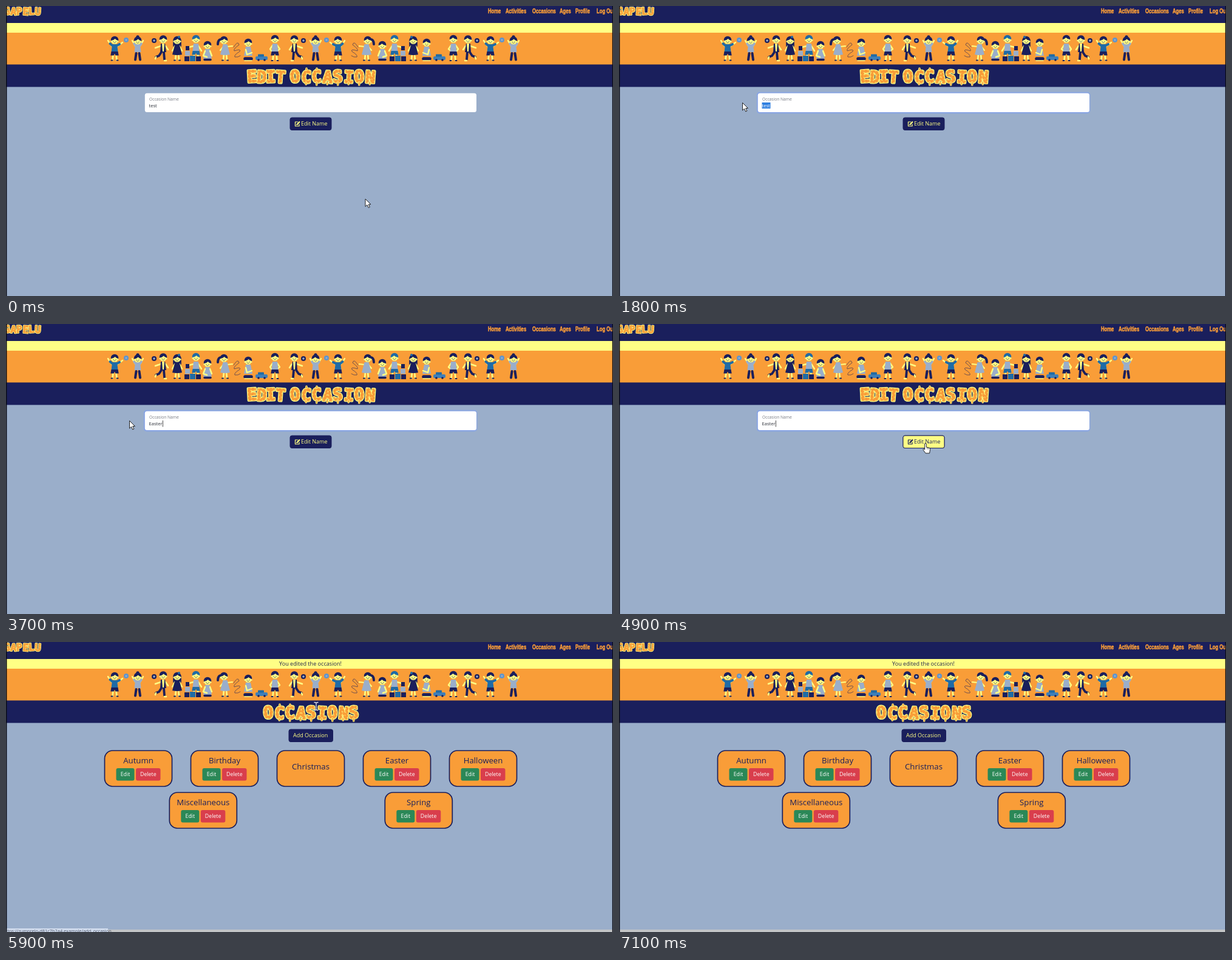
An HTML page that plays this animation: 1000 by 478 pixels, repeating every 7200 ms.

```html
<!DOCTYPE html>
<html lang="en">
<head>
<meta charset="utf-8">
<title>Edit occasion</title>
<style>
html, body { margin: 0; width: 100%; height: 100%; overflow: hidden; background: #9aaeca; }
svg { display: block; width: 100vw; height: 100vh; }
text { font-family: "Open Sans", sans-serif; white-space: pre; }
.nav text { font: bold 10px "Liberation Sans", sans-serif; fill: #f99d38; stroke: #f99d38; stroke-width: .5; stroke-linejoin: round; }
.fancy text { font-family: "DejaVu Sans Mono", monospace; font-weight: bold; }
.mid { text-anchor: middle; }
</style>
</head>
<body>
<svg id="stage" viewBox="0 0 1000 478" preserveAspectRatio="none"></svg>
<script>
const NAVY = '#1a1f5c', SKIN = '#ffff85', BLUE = '#1f6ba6', PALE = '#9aaeca', ORANGE = '#f99d38';
const LOOP = 7200, STEP = 100;

// Shape helpers
const circle = (x, y, r, f) => `<circle cx="${x}" cy="${y}" r="${r}" fill="${f}"/>`;
const rect = (x, y, w, h, f, r = 0, more = '') =>
  `<rect x="${x}" y="${y}" width="${w}" height="${h}" rx="${r}" fill="${f}" ${more}/>`;
const fill = (d, f) => `<path d="${d}" fill="${f}"/>`;
const line = (d, s, w) =>
  `<path d="${d}" fill="none" stroke="${s}" stroke-width="${w}" stroke-linecap="round" stroke-linejoin="round"/>`;
const text = (x, y, size, f, s, more = '') =>
  `<text x="${x}" y="${y}" font-size="${size}" fill="${f}" ${more}>${s}</text>`;
const group = (id, body, more = '') => `<g id="${id}" ${more}>${body}</g>`;

// Children of the banner, each around x = 0
const head = (x, y, hair = NAVY) =>
  circle(x, y - 1, 6.2, hair) + circle(x - 5.3, y + 1.5, 1.3, SKIN) + circle(x + 5.3, y + 1.5, 1.3, SKIN) +
  `<ellipse cx="${x}" cy="${y + 1}" rx="5.4" ry="4.8" fill="${SKIN}"/>` +
  fill(`M${x - 5.8} ${y}q0-6 6-6q5.600 0 5.600 6q-4-1-5-3q-3 3-6.600 3z`, hair) +
  circle(x - 2, y + 1.5, .6, NAVY) + circle(x + 2, y + 1.5, .6, NAVY) +
  line(`M${x - 1.5} ${y + 3.4}q1.5 1.2 3 0`, NAVY, .6);
const legs = (top, end, gap = 2.5) =>
  line(`M${-gap} ${top}L${-gap - 1} ${end}M${gap} ${top}L${gap + 1} ${end}`, SKIN, 2.6) +
  line(`M${-gap - 1} ${end}h-2M${gap + 1} ${end}h2`, NAVY, 2);
const shirt = (f, top = 63) => fill(`M-4 ${top}h8l1.500 13h-11z`, f);
const shorts = (f, top = 75) => fill(`M-5.500 ${top}h11l1.200 6.500h-5.200l-1.500-3l-1.500 3h-5.200z`, f);
const gown = f => fill('M-3.500 63h7l4.500 17q-8 2-16 0z', f);

const kids = {
  cheer: line('M-5 66L-11 57M5 66L13 60', SKIN, 2.4) + line('M-4 65L-7.500 62M4 65L8 63', BLUE, 4) + legs(80, 89.5) +
    shirt(BLUE) + shorts(NAVY) + head(0, 57) + circle(19, 56, 4, '#5f95cc') + circle(19, 56, 1.6, PALE),
  bun: line('M-4 66L-9 57M4 66L9 57', SKIN, 2.4) + line('M-4 65L-6 62M4 65L6 62', PALE, 3.5) +
    line('M-2.500 78L-4 88.500M2.500 78L4 88.500', NAVY, 4) + shirt(PALE) + circle(0, 50.8, 2.6, NAVY) + head(0, 57.5),
  kick: line('M1 76L-3 82L-8 84M5 76L6 88', NAVY, 3.8) + line('M0 66L-9 69M8 66L12 72', SKIN, 2.4) +
    line('M-8 84l-1 3M6 90h3', SKIN, 2.4) + fill('M0 62h7l2 14h-10z', NAVY) +
    fill('M2 62h4l-1 13h-2z', SKIN) + head(4, 55.5) + circle(-11, 57, 4, NAVY) + circle(-11, 57, 1.8, PALE),
  dress: rect(-6.8, 52, 13.6, 18, NAVY, 5) + legs(79, 89.5, 2) + line('M-4 66L-8 74M4 66L8 74', SKIN, 2.2) +
    gown(NAVY) + head(0, 57) + circle(3, 51, 2, BLUE),
  builder: line('M-4 66L-12 68M4 66L9 74', SKIN, 2.4) + legs(77, 84) + shirt(PALE, 62) + shorts(BLUE, 74) +
    head(0, 55, BLUE) + rect(-19, 83, 8, 8, NAVY) +
    rect(-10, 82, 9, 9, BLUE) + rect(0, 83, 8, 8, NAVY) + rect(-18, 74, 8, 8, PALE) + rect(-17, 66, 6, 7, NAVY),
  crouch: fill('M-4 71h8l3 15q-7 4-14 0z', PALE) + line('M-5 88.500h10', NAVY, 3.5) +
    line('M-4 74L-7 82L-1 84M4 74L7 82', SKIN, 2.4) + head(0, 65),
  ribbon: line('M-7 55q-5 1-5 8', NAVY, 4) + legs(79, 89.5, 2) + line('M3 67L12 66M-3 67L-8 73', SKIN, 2.2) +
    gown(PALE) + head(-2, 57) +
    line('M14 68q7-12 9-4q-10 7-8 10q12-4 9 1q-10 6-8 9q5 1 9-2', NAVY, .6),
  sit: fill('M-4 67h8l3 15h-14z', PALE) + line('M-5 87H5', NAVY, 5.5) + line('M-4 72L-2 80L6 77', SKIN, 2.4) +
    line('M-6 90h12', SKIN, 1.5) + head(0, 61),
  car: rect(-10, 83, 20, 6, '#3f7fb8', 2) + rect(-6, 79.5, 10, 4, BLUE, 1) + circle(-5, 89, 1.8, NAVY) + circle(5, 89, 1.8, NAVY),
  stand: line('M-4 65L-8 71L-5 75M4 65L8 71L4 74', SKIN, 2.4) + legs(80, 90) + shirt(PALE, 62) + shorts(NAVY) + head(0, 55)
};
// "<" marks a mirrored figure
const row = `cheer 179,bun 217,kick 255,dress 282,builder 313,crouch 332,ribbon 361,sit 399,car 421,stand 443,
kick 479 <,bun 510 <,cheer 547 <,ribbon 594 <,crouch 620 <,builder 640 <,dress 671 <,sit 693 <,car 714,stand 737 <,
kick 765 <,cheer 798,bun 836`.split(',').map(s => {
  const [kind, x, flip] = s.trim().split(' ');
  return `<g transform="translate(${x})${flip ? ' scale(-1 1)' : ''}">${kids[kind]}</g>`;
}).join('');

// Wobbly outlined lettering
function fancy(word, x, y, size, gap = 0) {
  const turn = [...word].map((_, i) => [-3, 3, -2, 4][i % 4]).join(' ');
  const more = `letter-spacing="${gap}" rotate="${turn}" stroke-linejoin="round"`;
  const k = size / 27;
  return text(x, y, size, SKIN, word, `${more} stroke="${SKIN}" stroke-width="${4.2 * k}"`) +
    text(x, y, size, ORANGE, word, `${more} stroke="${ORANGE}" stroke-width="${1.8 * k}"`) +
    text(x, y, size, 'none', word, `${more} stroke="${SKIN}" stroke-width="${.7 * k}" stroke-dasharray="${2 * k} ${4 * k}"`);
}
function drips(x, n) {
  let d = '';
  for (let i = 1; i < n; i++) d += `M${x + 17.5 * (i + .5)} 126v${i % 2 ? 3 : 4}`;
  d += `M${x + 27} 105v-2M${x + 44} 105v-2`;
  return line(d, SKIN, 3.6) + line(d, ORANGE, 1.8);
}

const nav = [['Home', 794], ['Activities', 823], ['Occasions', 867], ['Ages', 912], ['Profile', 938], ['Log Out', 973]]
  .map(([s, x]) => `<g transform="translate(${x} 12) scale(.77 1)"><text>${s}</text></g>`).join('');

const pen = c => line('M480.5 191h-4v7h6.5v-3', c, 1.2) + line('M479.3 195.4l4-4.2', c, 2.2);
const button = (x, y, w, back, ink, s, tx, extra = '') =>
  rect(x + .5, y + .5, w - 1, 20.5, back, 3, `stroke="${NAVY}"`) + extra + text(tx, y + 13.8, 9, ink, s);
const hoverable = (id, make) => make(NAVY, SKIN) + group(id, make(SKIN, NAVY));

const card = (s, x, y, plain) =>
  rect(x - 55.5, y, 111, 59, ORANGE, 13, `stroke="${NAVY}" stroke-width="1.7"`) +
  text(x, y + (plain ? 31 : 21), 13.2, NAVY, s, 'class="mid"') +
  (plain ? '' : rect(x - 36.5, y + 29, 30, 20.5, '#2b8857', 3) + rect(x - 4, y + 29, 40.5, 20.5, '#d93e4c', 3) +
    text(x - 21.5, y + 42.3, 8.8, '#fff', 'Edit', 'class="mid"') +
    text(x + 16.3, y + 42.3, 8.8, '#fff', 'Delete', 'class="mid"'));

const editPage =
  group('t1', fancy('EDIT', 397.5, 126, 27, -.9) + fancy('OCCASION', 468.5, 126, 27, 1.3) + drips(468, 8), 'class="fancy"') +
  group('ring', rect(226.5, 141.5, 550, 36, '#8fa9dc', 5) + rect(227.8, 142.8, 547.4, 33.4, '#84a0e4', 4)) +
  rect(228.8, 143.8, 546.2, 31.2, '#fff', 3.5) +
  text(236, 156.3, 6.7, '#777b84', 'Occasion Name') +
  rect(236, 159, 0, 10, '#2f7fe0', 0, 'id="mark"') +
  text(235.5, 167.3, 7.6, '#2b2f38', 'test', 'id="value"') +
  rect(0, 159, .8, 10.5, '#222', 0, 'id="caret"') +
  hoverable('hot1', (back, ink) => button(467.5, 183.5, 69, back, ink, 'Edit Name', 486, pen(ink))) +
  group('popup', fill('M286.5 181.5l5.5-5.5l5.5 5.5z', '#fff') +
    rect(281, 180.5, 84, 23.7, '#fff', 2, 'stroke="#a9b5c9" stroke-width=".5"') + text(287.5, 195.2, 6.7, '#333', 'Easter'));

const listPage =
  text(501.5, 39.3, 9.1, '#22264f', 'You edited the occasion!', 'class="mid"') +
  group('t2', fancy('OCCASIONS', 424.5, 126, 27, 1.3) + drips(424, 9), 'class="fancy"') +
  hoverable('hot2', (back, ink) => button(465.5, 143.5, 73.5, back, ink, 'Add Occasion', 473)) +
  ['Autumn', 'Birthday', 'Christmas', 'Easter', 'Halloween'].map((s, i) => card(s, 218 + 142 * i, 179, i === 2)).join('') +
  card('Miscellaneous', 324.8, 248) + card('Spring', 679.8, 248) +
  rect(0, 474, 1000, 4, '#c2c4c6') +
  group('status', rect(0, 472, 168, 6, '#cfdaec') +
    text(-5, 479.3, 7.4, '#50586a', 'https://zumprelo-d81c7b2a4.example/add_occasion'));

const cursors =
  group('arrow', `<path d="M0 0V12.5L3 9.8L5.2 14.5L7.3 13.5L5.2 9H9z" fill="#fff" stroke="#111" stroke-width=".9"/>`) +
  group('beam', line('M-3-6.5q2 0 3 1q1-1 3-1M0-5.5V5.5M-3 6.5q2 0 3-1q1 1 3 1', '#dfe3ec', 1.3)) +
  group('hand', `<path d="M-1.3 1q0-1.5 1.3-1.5t1.3 1.5V6l5 1.2q1.6.5 1.3 2.3l-1 6.5h-6.5l-4-5.5q-.5-2 1.6-1.2l1 .8z"
    fill="#fff" stroke="#111" stroke-width=".9"/>` + line('M2.8 6.5v2.5M5 7v2.3', '#111', .6));

const $ = id => document.getElementById(id);
$('stage').innerHTML =
  rect(0, 0, 1000, 478, PALE) + rect(0, 0, 1000, 28, NAVY) + rect(0, 28, 1000, 16, SKIN) +
  rect(0, 44, 1000, 53, ORANGE) + rect(0, 96.4, 1000, 37, NAVY) +
  group('logo', fancy('GAPELU', -3, 14.5, 16.5, .1), 'class="fancy"') +
  group('nav', nav, 'class="nav"') + row + group('edit', editPage) + group('list', listPage) +
  rect(0, 0, 1.4, 478, '#0c0d16') + rect(998.8, 0, 1.2, 478, '#0c0d16') + group('cursor', cursors);

// Pointer path: time, x, y
const path = [[100, 592, 318], [900, 268, 169.5], [1000, 268, 169.5], [1400, 203.5, 159.5], [3800, 203.5, 159.5],
  [4650, 505, 197], [5500, 505, 197], [5900, 511, 106], [6400, 514, -20], [LOOP, 514, -20]];
// Time each text is typed
const typed = [[0, 'test'], [2000, 'E'], [2300, 'Ea'], [2700, 'Eas'], [2900, 'East'], [3100, 'Easte'], [3300, 'Easter']];

function pointer(t) {
  if (t <= path[0][0]) return path[0].slice(1);
  const i = path.findIndex(p => p[0] > t), [t0, x0, y0] = path[i - 1], [t1, x1, y1] = path[i];
  let k = (t - t0) / (t1 - t0);
  if (t < 5500) k = (1 - Math.cos(Math.PI * k)) / 2;
  return [x0 + (x1 - x0) * k, y0 + (y1 - y0) * k];
}
const show = (id, on) => $(id).setAttribute('display', on ? 'inline' : 'none');
const within = (t, a, b) => t >= a && t < b;

function draw(t) {
  const [x, y] = pointer(t), onList = t >= 5500;
  const over = (l, r, top, end) => x > l && x < r && y > top && y < end;
  show('edit', !onList);
  show('list', onList);

  const hot1 = !onList && over(468, 536, 183, 206), hot2 = onList && over(466, 539, 143, 166);
  const dragging = within(t, 1000, 1400);
  const beam = dragging || !onList && over(229, 775, 144, 175) || onList && over(424, 582, 99, 131);
  show('hand', hot1 || hot2);
  show('beam', beam);
  show('arrow', !hot1 && !hot2 && !beam);
  $('cursor').setAttribute('transform', `translate(${x} ${y})`);
  show('hot1', hot1);
  show('hot2', hot2);
  show('status', within(t, 5600, 6100));

  const value = typed.filter(e => e[0] <= t).pop()[1], box = $('value');
  if (box.textContent !== value) box.textContent = value;
  const start = Math.min(249.5, Math.max(235.5, x)), marked = within(t, 1000, 2000);
  $('mark').setAttribute('x', start);
  $('mark').setAttribute('width', marked ? 249.5 - start : 0);
  box.setAttribute('fill', marked && start < 242 ? '#fff' : '#2b2f38');
  show('ring', t >= 1000);
  show('popup', within(t, 2100, 3500));

  const blink = t < 3700 ? within(t, 2000, 3500) : (t - 3700) % 1000 < 500;
  show('caret', blink);
  if (!onList) $('caret').setAttribute('x', 235.8 + box.getComputedTextLength());
}
function frame(now) {
  draw(Math.floor(now % LOOP / STEP) * STEP);
  requestAnimationFrame(frame);
}
draw(0);
requestAnimationFrame(frame);
</script>
</body>
</html>
```
